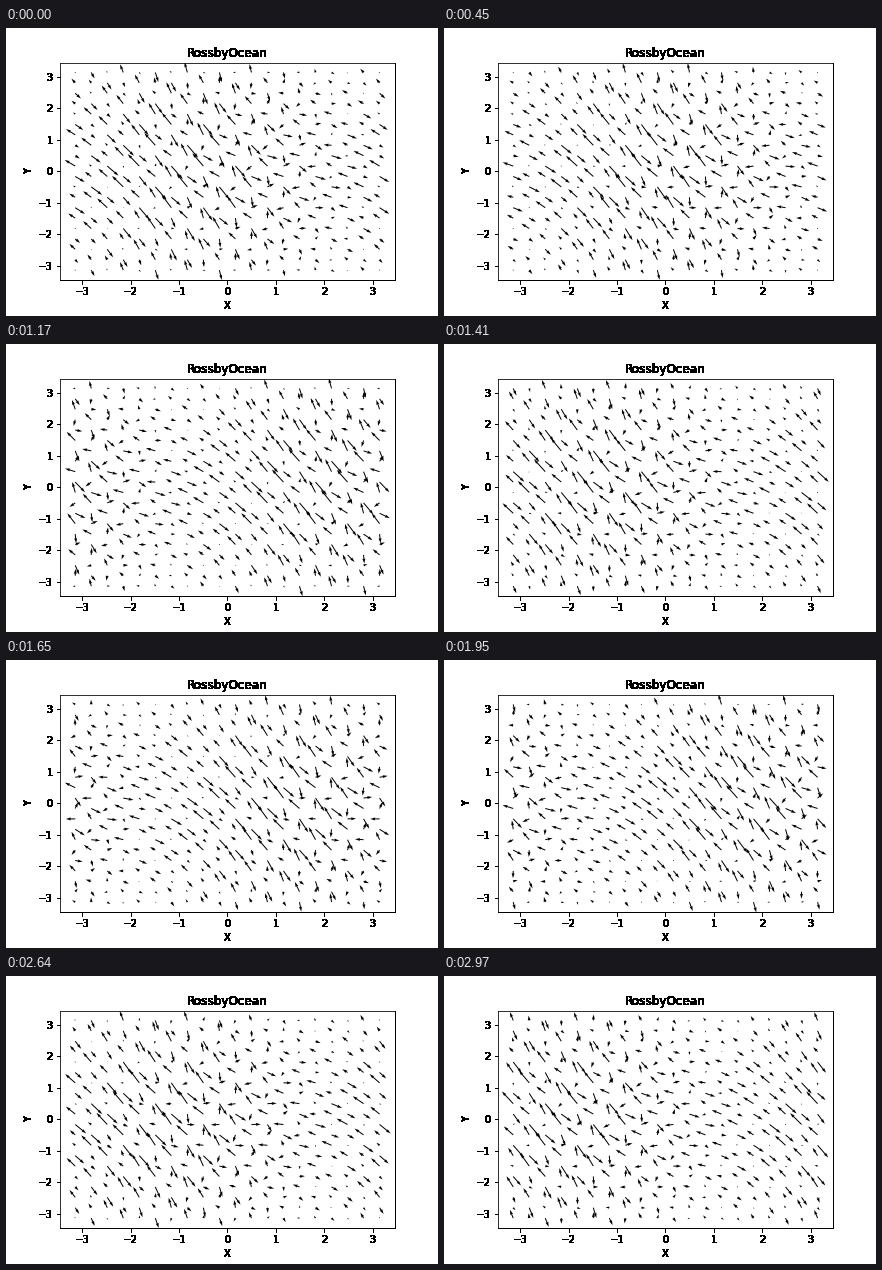
These frames come from a looping animation (432 px wide and 288 px high, 3000 ms). A matplotlib script:

```python
import numpy as np
import matplotlib.pyplot as plt
from matplotlib.animation import FuncAnimation

FRAMES, INTERVAL = 100, 30
LIMIT = 1.1 * np.pi

# wavenumbers, frequency per frame, phase, velocity amplitude in pixels;
# the last two beat into a westward moving envelope
WAVES = [
    (5, 7, 0.425, 1.68, (-11.0, 6.0)),
    (5, 7, 0.425, 0.38, (-0.5, 5.0)),
    (4, 7, -0.795, 0.28, (-0.5, 5.0)),
]

grid = np.linspace(-np.pi, np.pi, 20)
X, Y = np.meshgrid(grid, grid)
U_TAPER = 0.3 + 0.7 * np.cos(Y / 2)
V_TAPER = 0.75 + 0.25 * np.cos(Y / 2)


def velocity(n):
    u, v = np.zeros_like(X), np.zeros_like(X)
    for k, l, omega, phase, (du, dv) in WAVES:
        wave = np.cos(k * X + l * Y + omega * n + phase)
        u += du * wave * U_TAPER
        v += dv * wave * V_TAPER
    return u, v


def harden(image, dpi):
    """Turn every touched pixel solid black."""
    solid = np.zeros_like(image)
    solid[..., 3] = image[..., 3] > 0
    return solid, 0, 0


plt.rcParams["font.family"] = "DejaVu Sans"
fig = plt.figure(figsize=(6, 4), dpi=72, facecolor="white")
ax = fig.add_axes([0.125, 0.125, 0.775, 0.755])
ax.set(xlim=(-LIMIT, LIMIT), ylim=(-LIMIT, LIMIT),
       xticks=range(-3, 4), yticks=range(-3, 4), xlabel="X", ylabel="Y")
title = ax.set_title("RossbyOcean")
for artist in (ax.xaxis, ax.yaxis, title):
    artist.set_agg_filter(harden)
for side in ("right", "bottom"):
    ax.spines[side].set_linewidth(1)

width = 0.775 * 432
arrows = ax.quiver(X, Y, *velocity(0), scale=width, width=0.003)


def update(n):
    arrows.set_UVC(*velocity(n))
    return arrows,


anim = FuncAnimation(fig, update, frames=FRAMES, interval=INTERVAL,
                     repeat=True, repeat_delay=0)
plt.show()
```
